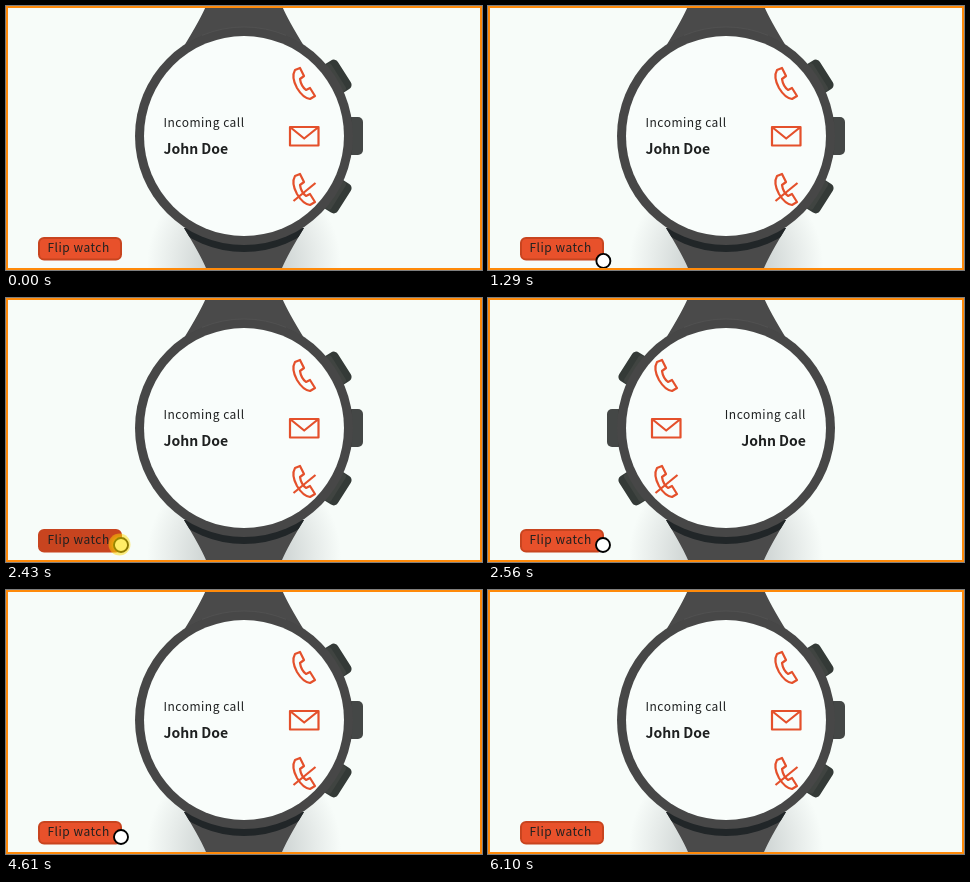
Recreate the animation shown at these times as an HTML page. Size 476 by 264 pixels, loop 6960 ms.

```html
<!DOCTYPE html>
<html lang="en">
<head>
<meta charset="utf-8">
<title>Flip watch</title>
<style>
  html, body { margin: 0; width: 100%; height: 100%; overflow: hidden; background: #f7fcf9; }
  svg { display: block; width: 476px; height: 264px; }
  text { font: 12px "Noto Sans CJK JP", "Noto Sans CJK SC", "Noto Sans", sans-serif; letter-spacing: .5px; fill: #1e2020; }
  .name { font-size: 14px; font-weight: 700; letter-spacing: 0; }
  .icons { fill: none; stroke: #e4502b; stroke-width: 2.2; stroke-linejoin: round; }
</style>
</head>
<body>
<svg viewBox="0 0 476 264">
  <defs>
    <radialGradient id="shade">
      <stop offset=".4" stop-color="#cfd5d4"/>
      <stop offset=".75" stop-color="#e7ecea"/>
      <stop offset="1" stop-color="#f7fcf9"/>
    </radialGradient>
    <radialGradient id="glow">
      <stop offset=".6" stop-color="#ffe000" stop-opacity=".6"/>
      <stop offset="1" stop-color="#ffd800" stop-opacity=".45"/>
    </radialGradient>
    <path id="strap" d="M200 0H276Q282 14 298 40H178Q194 14 200 0Z"/>
    <clipPath id="lower"><use href="#strap" transform="rotate(180 238 131)"/></clipPath>
    <g id="pusher" transform="rotate(-32.5 238 130)">
      <rect x="335" y="113" width="22" height="34" rx="5" fill="#343a37"/>
      <rect x="335" y="114" width="15" height="32" rx="3" fill="#404441"/>
    </g>
    <path id="phone" d="M294 62L298 70L294 73Q295 80 300 84L304 82L309 90L304 93Q297 92 291 82Q285 71 289 64Z"/>
  </defs>

  <rect width="476" height="264" fill="#f7fcf9"/>
  <circle cx="238" cy="258" r="97" fill="url(#shade)"/>

  <g id="knobs">
    <use href="#pusher"/>
    <use href="#pusher" transform="matrix(1 0 0 -1 0 261)"/>
    <rect x="335" y="111" width="22" height="38" rx="5" fill="#444746"/>
    <rect x="340" y="112" width="6" height="36" fill="#383c3a"/>
  </g>

  <g fill="#4a4a4a">
    <use href="#strap"/>
    <use href="#strap" transform="rotate(180 238 131)"/>
  </g>
  <circle cx="238" cy="137" r="109" fill="#212628" clip-path="url(#lower)"/>
  <circle cx="238" cy="130" r="109" fill="#474747"/>
  <path d="M196 29.4A109 109 0 0 1 280 29.4" fill="none" stroke="#555" stroke-width=".7"/>
  <circle cx="238" cy="130" r="100" fill="#f9fdfb"/>

  <g id="caller">
    <text y="121">Incoming call</text>
    <text y="148" class="name">John Doe</text>
  </g>
  <g id="icons" class="icons">
    <use href="#phone"/>
    <path d="M284 121H312.5V139.500H284ZL298.200 132.500L312.500 121"/>
    <use href="#phone" y="106"/>
    <path d="M287.500 195L309.500 177"/>
  </g>

  <rect id="button" x="33" y="232" width="82" height="21.500" rx="5" stroke="#c8441f" stroke-width="2"/>
  <text x="41.500" y="246">Flip watch</text>

  <g id="cursor">
    <circle r="7" fill="#fff" stroke="#000" stroke-width="1.900"/>
    <circle id="halo" cx="-1.500" cy="-.5" r="11" fill="url(#glow)"/>
  </g>
  <rect x="1" y="1" width="474" height="262" fill="none" stroke="#ff8a0a" stroke-width="2"/>
</svg>
<script>
  const LOOP = 6960;
  const el = id => document.getElementById(id);
  const set = (id, attrs) => {
    for (const key in attrs) el(id).setAttribute(key, attrs[key]);
  };
  const between = (t, a, b) => t >= a && t < b;

  // The pointer moves in held steps: in from below, a nudge up, and out again.
  function pointer(t) {
    if (t < 1010 || t >= 6100) return null;
    if (t < 1760) {
      const left = 1 - Math.min(8, Math.floor((t - 1010) / 68.75)) / 8;
      return [115 + 3 * left ** 3, 250 + 16 * left ** 1.7];
    }
    if (t < 1830) return [115, 248];
    if (t < 5800) return [115, 247];
    const p = (Math.floor((t - 5800) / 75) + 1) / 5;
    return [115 + 4 * p * p, 247 + 24 * p * p];
  }

  function draw(t) {
    const flipped = between(t, 2560, 4610);
    const pressed = between(t, 2430, 2560) || between(t, 4480, 4610);
    const at = pointer(t);

    set("knobs", { transform: flipped ? "matrix(-1 0 0 1 476 0)" : "" });
    set("icons", { transform: flipped ? "translate(-120 0)" : "" });
    set("caller", {
      transform: `translate(${flipped ? 318 : 157.5} 0)`,
      "text-anchor": flipped ? "end" : "start"
    });
    set("button", { fill: pressed ? "#c8441f" : "#e8512b" });
    set("halo", { visibility: pressed ? "inherit" : "hidden" });
    set("cursor", {
      visibility: at ? "visible" : "hidden",
      transform: at ? `translate(${at})` : ""
    });
  }

  const start = performance.now();
  function tick() {
    draw((performance.now() - start) % LOOP);
    requestAnimationFrame(tick);
  }
  tick();
</script>
</body>
</html>
```
